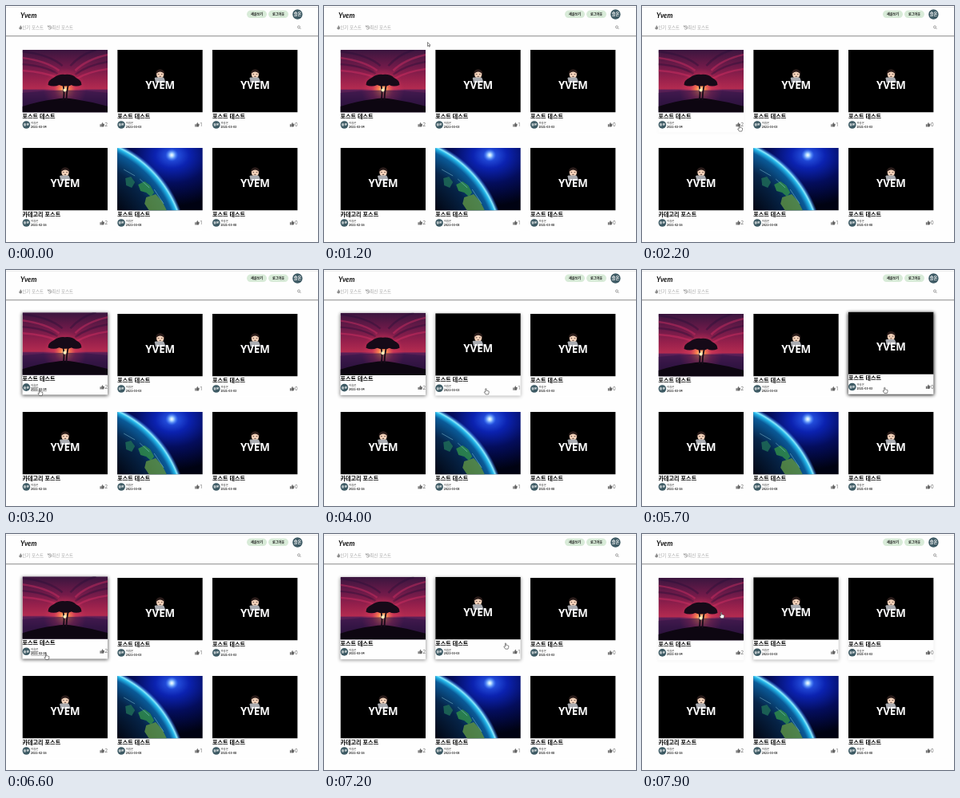
An HTML page that plays this animation: 390x296 px, repeating every 8000 ms.

```html
<!DOCTYPE html>
<html lang="ko">
<head>
<meta charset="utf-8">
<title>Blog post list</title>
<style>
  html, body { margin: 0; width: 100%; height: 100%; overflow: hidden; background: #fefefe; }
  svg { display: block; width: 390px; height: 296px; }
  text { font-family: "Noto Sans CJK KR", "Noto Sans CJK", "Noto Sans CJK JP", sans-serif; fill: #111; }
  .brand { font: italic 700 8.8px Lato, cursive; }
  .pill { font-size: 4.1px; font-weight: 700; text-anchor: middle; }
  .nav { font-size: 5.5px; fill: #a6a6a6; }
  .title { font-size: 7.1px; font-weight: 700; fill: #000; }
  .name { font-size: 3.4px; fill: #333; }
  .date { font-size: 3.6px; font-weight: 700; fill: #222; }
  .count { font: 6.2px "Open Sans", sans-serif; fill: #666; }
  .face { font-weight: 700; fill: #fff; text-anchor: middle; }
  .cover { font: 700 13.3px "Noto Sans", sans-serif; fill: #fff; text-anchor: middle; }
  .shadow { filter: blur(2.2px); }
</style>
</head>
<body>
<svg viewBox="0 0 390 296">
  <defs>
    <linearGradient id="dusk" x2="0" y2="1">
      <stop offset="0" stop-color="#3a163f"/>
      <stop offset=".25" stop-color="#6d1a49"/>
      <stop offset=".45" stop-color="#97204c"/>
      <stop offset=".62" stop-color="#b32b50"/>
      <stop offset=".64" stop-color="#5c2058"/>
      <stop offset=".8" stop-color="#32133c"/>
      <stop offset="1" stop-color="#140919"/>
    </linearGradient>
    <radialGradient id="sun">
      <stop offset="0" stop-color="#fff0c0"/>
      <stop offset=".18" stop-color="#ff8a50"/>
      <stop offset=".5" stop-color="#e0405a" stop-opacity=".55"/>
      <stop offset="1" stop-color="#d0305a" stop-opacity="0"/>
    </radialGradient>
    <radialGradient id="space" cx=".64" cy=".12" r=".8">
      <stop offset="0" stop-color="#2f62f0"/>
      <stop offset=".25" stop-color="#0b22b0"/>
      <stop offset=".55" stop-color="#040d5c"/>
      <stop offset="1" stop-color="#000212"/>
    </radialGradient>
    <radialGradient id="star">
      <stop offset="0" stop-color="#fff"/>
      <stop offset=".3" stop-color="#a8d4ff"/>
      <stop offset="1" stop-color="#3a7cff" stop-opacity="0"/>
    </radialGradient>
    <radialGradient id="globe">
      <stop offset=".55" stop-color="#020816"/>
      <stop offset=".78" stop-color="#062448"/>
      <stop offset=".92" stop-color="#0a5a98"/>
      <stop offset=".955" stop-color="#22b4e8"/>
      <stop offset=".97" stop-color="#8ceaff"/>
      <stop offset="1" stop-color="#1450e0" stop-opacity="0"/>
    </radialGradient>
    <clipPath id="frame"><rect width="106.5" height="78.3"/></clipPath>

    <g id="sunset">
      <rect width="107" height="79" fill="url(#dusk)"/>
      <g fill="none" stroke-width="2.5" opacity=".4">
        <path d="M0 10Q30 14 46 26M0 26Q28 28 44 35M107 6Q80 12 66 26M107 24Q84 27 68 36" stroke="#e03468"/>
        <path d="M0 2Q34 6 50 20M0 18Q28 20 44 30M107 15Q82 19 66 31M92 0Q72 6 60 20" stroke="#260f38"/>
      </g>
      <circle cx="53" cy="50" r="27" fill="url(#sun)"/>
      <path d="M0 54Q53 47 107 54V79H0Z" fill="#35164a" opacity=".6"/>
      <path d="M0 71Q22 64 40 62Q53 59 66 62Q86 65 107 71V79H0Z" fill="#0d0611"/>
      <path d="M32 44Q32 38 39 35Q46 30 53 31Q62 30 67 35Q74 38 74 44Q67 47 61 44Q53 47 46 44Q39 47 32 44Z" fill="#160a18"/>
      <path d="M51 63Q53 55 51 44L43 41M55 63Q55 55 57 45L65 41" fill="none" stroke="#160a18" stroke-width="1.8"/>
      <circle cx="53" cy="50.5" r="2" fill="#fff0b8"/>
    </g>

    <g id="earth">
      <rect width="107" height="79" fill="url(#space)"/>
      <circle cx="-60" cy="130" r="149" fill="url(#globe)"/>
      <g fill="#2f8a4a" opacity=".85">
        <path d="M26 46L34 42L41 47L46 56L42 61L36 56L29 54Z"/>
        <path d="M36 62L48 58L56 67L62 79H40L34 70Z" fill="#5b8f45"/>
        <path d="M10 38L17 36L22 43L18 50L11 47Z" fill="#1f6a58"/>
      </g>
      <path d="M8 27L22 35M28 39L40 50M46 52L58 70" stroke="#a5e4f0" opacity=".4"/>
      <circle cx="68" cy="9" r="8" fill="url(#star)"/>
    </g>

    <g id="plain">
      <rect width="107" height="79" fill="#000"/>
      <path d="M47 41Q47 35 53.5 34.5Q60 35 60.5 41Z" fill="#4a4f5c"/>
      <ellipse cx="53.5" cy="29.5" rx="5.5" ry="5.2" fill="#2a1c1a"/>
      <path d="M49 29.5Q53.5 25.6 58 29.5Q58.6 35.4 53.5 35.8Q48.4 35.4 49 29.5Z" fill="#f3d2ba"/>
      <path d="M50.6 30.6h1.6M54.8 30.6h1.6M52.5 33.4h2" stroke="#3b2622" stroke-width=".8"/>
      <path d="M46.5 35.5Q47 34.5 48 34.5H57Q58 34.5 58.4 35.5L60 41H48Z" fill="#a9abb0"/>
      <text class="cover" x="53.5" y="48.8">YVEM</text>
    </g>

    <path id="thumb" d="M0 2.3H1.3V5.4H0ZM1.7 2.4L3 0Q4 0 3.7 1.8H5.2Q5.7 2 5.4 3L4.9 5.1Q4.7 5.5 4 5.4H1.7Z" fill="#666"/>
  </defs>

  <rect width="390" height="296" fill="#fefefe"/>
  <path d="M0 1.5H390" stroke="#ececec"/>
  <text class="brand" x="18" y="15">Yvem</text>
  <rect x="301" y="5.5" width="25" height="9.6" rx="4.8" fill="#d8ebd8"/>
  <text class="pill" x="313.5" y="11.8">새글쓰기</text>
  <rect x="328" y="5.5" width="25" height="9.6" rx="4.8" fill="#d8ebd8"/>
  <text class="pill" x="340.5" y="11.8">로그아웃</text>
  <circle cx="364.4" cy="10.5" r="6.2" fill="#3c5963"/>
  <text class="face" x="364.4" y="12.4" font-size="5.2">슬온</text>
  <path d="M18.3 24Q18.5 25.3 19.8 26.4Q20.5 29.4 18.2 29.5Q15.8 29.2 16.5 26.8L17.3 27Q17.2 25 18.3 24Z" fill="#888"/>
  <text class="nav" x="20.3" y="28.8">인기 포스트</text>
  <path d="M53 25.6A2.2 2.2 0 1 1 53 28.4M52.4 24.3V26.2H54.2M54.8 25.6V27.2L56 27.8" fill="none" stroke="#888" stroke-width=".7"/>
  <text class="nav" x="57.3" y="28.8">최신 포스트</text>
  <g fill="none" stroke="#666" stroke-width=".6"><circle cx="366" cy="26.4" r="1.5"/><path d="M367.1 27.5L368.6 29"/></g>
  <path d="M0 37.7H390" stroke="#8c8c8c"/>
  <g id="cards"></g>
  <g id="cursor" stroke="#333" stroke-width=".6" stroke-linejoin="round">
    <path id="arrow" d="M0 0V5L1.2 4L2 5.7L2.8 5.4L2 3.7H3.5Z" fill="#fff"/>
    <path id="hand" d="M.2 .6Q1 -.3 1.4 .7V3Q2.2 2.4 2.6 3.2Q3.4 2.7 3.7 3.5Q4.7 3.2 4.6 4.3Q4.6 6 3.8 7.6H.5L-1.4 4.8Q-1.3 3.9 .2 4.7Z" fill="#fff"/>
  </g>
</svg>
<script>
const LOOP = 8000, STEP = 100, FADE = 300, LIFT = 2.5;
const WIDTH = 106.5, HEIGHT = 100, LINK_END = 96;
const $ = id => document.getElementById(id);

const posts = [
  ["sunset", "포스트 테스트", "2021-03-04", 2],
  ["plain", "포스트 테스트", "2021-03-03", 1],
  ["plain", "포스트 테스트", "2021-03-03", 0],
  ["plain", "카테고리 포스트", "2021-02-16", 2],
  ["earth", "포스트 테스트", "2021-03-08", 1],
  ["plain", "포스트 테스트", "2021-03-08", 0]
];
const cardX = i => 20.5 + (i % 3) * 118.7;
const cardY = i => 55 + Math.floor(i / 3) * 123;

$("cards").innerHTML = posts.map(([art, title, date, likes]) => `<g>
  <rect class="shadow" x="-.5" y="1" width="107.5" height="103.5" fill="#000" opacity="0"/>
  <rect width="106.5" height="103.3" fill="#fefefe"/>
  <use href="#${art}" clip-path="url(#frame)"/>
  <text class="title" x="0" y="85.8">${title}</text>
  <circle cx="4.9" cy="94" r="4.8" fill="#3c5963"/>
  <text class="face" x="4.9" y="95.4" font-size="3.9">슬온</text>
  <g class="link">
    <text class="name" x="10.6" y="92.8">하슬온</text>
    <text class="date" x="10.6" y="97.6">${date}</text>
  </g>
  <use href="#thumb" x="97" y="91"/>
  <text class="count" x="103" y="96.2">${likes}</text>
</g>`).join("");
const cards = [...$("cards").children];

// time, x, y of the pointer tip: it sweeps to and fro along the upper row
const path = [
  [0, -12, 48], [900, 128, 44], [1200, 129.5, 45.5], [2120, 133, 130],
  [2200, 121, 149.5], [2350, 110, 166], [2650, 56, 166], [3200, 41.3, 150],
  [3600, 50, 149], [4300, 300, 148], [4800, 165, 152], [5400, 305, 148],
  [6000, 300, 146], [6650, 45, 150], [6800, 46, 150], [7450, 315, 130],
  [8150, 9, 85]
];

const smooth = v => v * v * (3 - 2 * v);

function pointer(t) {
  const k = path.findIndex(p => p[0] > t);
  const [t0, x0, y0] = path[k - 1], [t1, x1, y1] = path[k];
  const u = smooth((t - t0) / (t1 - t0));
  return [x0 + (x1 - x0) * u, y0 + (y1 - y0) * u];
}

function offset(i, t) {
  const [x, y] = pointer(t);
  return [x - cardX(i), y - cardY(i)];
}

const inside = ([dx, dy], height) => dx > 0 && dx < WIDTH && dy > 0 && dy < height;

// Hover progress of each card at every step, worked out once from the path.
function hoverTrack(i) {
  const track = [], tick = 10;
  let p = 0;
  for (let t = 0; t < LOOP; t += tick) {
    if (t % STEP === 0) track.push(smooth(p));
    const change = inside(offset(i, t), HEIGHT) ? tick : -tick;
    p = Math.min(1, Math.max(0, p + change / FADE));
  }
  return track;
}
const tracks = posts.map((_, i) => hoverTrack(i));

function draw(step) {
  const t = step * STEP;
  let hand = false;
  cards.forEach((card, i) => {
    const p = tracks[i][step], at = offset(i, t);
    const active = inside(at, LINK_END);
    const onLink = active && at[1] > 90 && at[0] > 10 && at[0] < 30;
    hand = hand || active;
    card.setAttribute("transform", `translate(${cardX(i)} ${cardY(i) - LIFT * p})`);
    card.firstElementChild.setAttribute("opacity", p * .9);
    card.querySelector(".link").style.textDecoration = onLink ? "underline" : "none";
  });
  $("cursor").setAttribute("transform", `translate(${pointer(t)})`);
  $("hand").style.display = hand ? "" : "none";
  $("arrow").style.display = hand ? "none" : "";
}

const start = performance.now();
function tick() {
  draw(Math.floor((performance.now() - start) % LOOP / STEP));
  requestAnimationFrame(tick);
}
tick();
</script>
</body>
</html>
```
